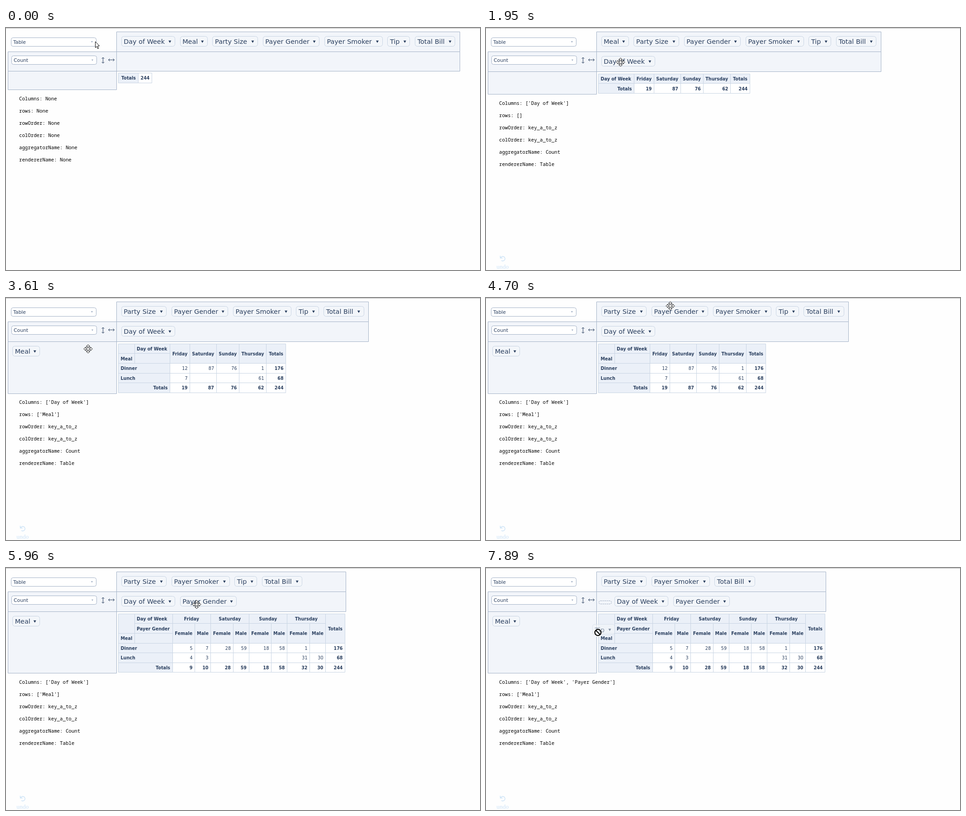
These frames come from a looping animation (1048 px wide and 535 px high, 8 s). An HTML page with a canvas:

```html
<!DOCTYPE html>
<html lang="en">
<head>
<meta charset="utf-8">
<title>Pivot table</title>
<style>
  html, body { margin: 0; width: 100%; height: 100%; overflow: hidden; background: #fefefe; }
  canvas { display: block; }
</style>
</head>
<body>
<canvas id="stage" width="1048" height="535"></canvas>
<script>
const ctx = document.getElementById('stage').getContext('2d');
const LOOP = 8000;
const INK = '#2a3f5f', FRAME = '#a2b1c6', SOFT = '#c8d4e3', ZONE = '#f2f5fa', HEAD = '#ebf0f8';
const SANS = '"DejaVu Sans", Verdana, sans-serif';
const GAP = 11.5, LEFT = 244.5, PLACEHOLDER = 29;

const chipWidths = {
  'Day of Week': 118.5, 'Meal': 60.4, 'Party Size': 99.7, 'Payer Gender': 124.7,
  'Payer Smoker': 127.9, 'Tip': 49.3, 'Total Bill': 88.5
};
const fields = Object.keys(chipWidths);
const days = ['Friday', 'Saturday', 'Sunday', 'Thursday'];
const daysAndTotals = [...days, 'Totals'];

// Heads are [col, row, endCol, endRow, text, align] in grid units.
const tables = [
  { top: 99.5, xs: [248.5, 292, 322.5], labelCols: 1, headRows: 0, heads: [], rows: ['Totals,244'] },
  {
    top: 101.3, xs: [248.5, 327.5, 371.5, 430, 480, 540.5, 583.5], labelCols: 1, headRows: 1,
    heads: [[0, 0, 1, 1, 'Day of Week', 'left'], ...daysAndTotals.map((d, i) => [1 + i, 0, 2 + i, 1, d])],
    rows: ['Totals,19,87,76,62,244']
  },
  {
    top: 101.3, xs: [248.5, 284, 362.5, 406.5, 465, 515.5, 575.5, 618.7], labelCols: 2, headRows: 2,
    heads: [[0, 0, 1, 1, ''], [1, 0, 2, 1, 'Day of Week', 'left'], [0, 1, 1, 2, 'Meal', 'left'], [1, 1, 2, 2, ''],
      ...daysAndTotals.map((d, i) => [2 + i, 0, 3 + i, 2, d])],
    rows: ['Dinner,12,87,76,1,176', 'Lunch,7,,,61,68', 'Totals,19,87,76,62,244']
  },
  {
    top: 101.3, xs: [248.5, 284, 368, 417.5, 452.5, 502, 537, 586.5, 621.5, 671.5, 706.5, 749.5],
    labelCols: 2, headRows: 3,
    heads: [[0, 0, 1, 2, ''], [1, 0, 2, 1, 'Day of Week', 'left'], [1, 1, 2, 2, 'Payer Gender', 'left'],
      [0, 2, 1, 3, 'Meal', 'left'], [1, 2, 2, 3, ''],
      ...days.map((d, i) => [2 + 2 * i, 0, 4 + 2 * i, 1, d]),
      ...[...days, ...days].map((_, i) => [2 + i, 1, 3 + i, 3, i % 2 ? 'Male' : 'Female']),
      [10, 0, 11, 3, 'Totals']],
    rows: ['Dinner,5,7,28,59,18,58,1,,176', 'Lunch,4,3,,,,,31,30,68', 'Totals,9,10,28,59,18,58,32,30,244']
  }
];
const zoneBottoms = [[95.5, 136.5], [96.5, 146.5], [96.5, 211], [96.5, 232.5]];

const drag = (name, dx, dy) => ({ drag: { name, dx, dy } });
const dayDrag = drag('Day of Week', 41, 20), mealDrag = drag('Meal', 21, 19);
const genderDrag = drag('Payer Gender', 54, 10), tipDrag = drag('Tip', 12, 18);
const drop = { drag: null, slot: null };

// [ms, cursor, x, y, state changes]; changes accumulate through the loop.
const steps = [
  [0, 'arrow', 197, 30, { table: 0, cols: [], rows: [], props: null, drag: null, slot: null }],
  [120, 'arrow', 184, 28],
  [240, 'arrow', 173, 26],
  [670, 'arrow', 229, 24],
  [790, 'move', 275, 27],
  [950, 'move', 296, 37],
  [1090, 'move', 295, 37],
  [1530, 'drag', 297, 67, { ...dayDrag, slot: ['cols', 0] }],
  [1680, 'drag', 297, 74],
  [1830, 'move', 297, 75, { ...drop, cols: ['Day of Week'], table: 1 }],
  [1950, 'move', 297, 75, { props: [['Day of Week'], []] }],
  [2370, 'move', 291, 55],
  [2500, 'move', 284, 34],
  [2640, 'move', 282, 32],
  [3070, 'drag', 242, 66, { ...mealDrag, slot: ['cols', 0] }],
  [3190, 'deny', 208, 84],
  [3340, 'drag', 191, 99, { slot: ['rows', 0] }],
  [3470, 'drag', 181, 111],
  [3610, 'move', 181, 112, { ...drop, rows: ['Meal'], table: 2, props: [['Day of Week'], ['Meal']] }],
  [4550, 'move', 322, 37],
  [4700, 'move', 407, 17],
  [4840, 'move', 416, 23],
  [4970, 'move', 421, 26],
  [5400, 'drag', 413, 76, genderDrag],
  [5530, 'drag', 410, 83, { slot: ['cols', 1] }],
  [5830, 'drag', 420, 80],
  [5950, 'move', 421, 80, { ...drop, cols: ['Day of Week', 'Payer Gender'], table: 3 }],
  [6080, 'move', 421, 80, { props: [['Day of Week', 'Payer Gender'], ['Meal']] }],
  [6920, 'move', 458, 61],
  [7070, 'move', 497, 39],
  [7230, 'move', 519, 33],
  [7380, 'move', 520, 34],
  [7650, 'drag', 420, 66, tipDrag],
  [7770, 'drag', 300, 84, { slot: ['cols', 0] }],
  [7890, 'deny', 247.5, 142.5]
];

function stateAt(ms) {
  const state = {};
  for (const [at, cursor, x, y, changes] of steps) {
    if (at > ms) break;
    Object.assign(state, { cursor, x, y }, changes);
  }
  return state;
}

const snap = v => Math.floor(v) + 0.5;

function write(text, x, y, font, color = INK, align = 'left') {
  ctx.font = font;
  ctx.fillStyle = color;
  ctx.textAlign = align;
  ctx.fillText(text, x, y);
}

function box(x0, y0, x1, y1, fill, stroke, radius = 0) {
  x0 = snap(x0); y0 = snap(y0);
  ctx.beginPath();
  ctx.roundRect(x0, y0, snap(x1) - x0, snap(y1) - y0, radius);
  if (fill) { ctx.fillStyle = fill; ctx.fill(); }
  ctx.lineWidth = 1;
  ctx.strokeStyle = stroke;
  ctx.stroke();
}

function polygon(points, fill, stroke) {
  ctx.beginPath();
  points.forEach(([x, y]) => ctx.lineTo(x, y));
  ctx.closePath();
  ctx.fillStyle = fill;
  ctx.fill();
  if (stroke) { ctx.strokeStyle = stroke; ctx.lineWidth = 1; ctx.stroke(); }
}

function triangle(x, y, half, color) {
  polygon([[x - half, y - half * 0.75], [x + half, y - half * 0.75], [x, y + half]], color);
}

function chip(name, x, y) {
  const right = x + chipWidths[name];
  box(x, y, right, y + 22.5, '#f3f6fa', SOFT, 5);
  write(name, x + 5.2, y + 17, `14.4px ${SANS}`);
  triangle(right - 11.2, y + 12, 3, INK);
}

function placeholder(x, y, width) {
  ctx.setLineDash([3, 1.5]);
  box(x, y, x + width, y + 7, null, '#9aa8bd', 4);
  ctx.setLineDash([]);
}

function chipRow(names, y, slotIndex = -1) {
  let x = 255;
  names.forEach((name, i) => {
    if (i === slotIndex) { placeholder(x - 5.5, y + 10, 28); x += PLACEHOLDER; }
    chip(name, x, y);
    x += chipWidths[name] + GAP;
  });
  if (slotIndex === names.length) placeholder(x - 5.5, y + 10, 28);
}

function dropdown(label, x, y) {
  box(x, y, x + 188.5, y + 19, '#fff', FRAME, 4);
  write(label, x + 5, y + 13.5, `10.8px ${SANS}`);
  triangle(x + 179, y + 9.5, 2, FRAME);
}

function sortArrow(x, y, angle) {
  ctx.save();
  ctx.translate(x, y);
  ctx.rotate(angle);
  ctx.beginPath();
  ctx.moveTo(-6.5, 0); ctx.lineTo(6.5, 0);
  for (const s of [-1, 1]) {
    ctx.moveTo(s * 3.5, -3); ctx.lineTo(s * 6.5, 0); ctx.lineTo(s * 3.5, 3);
  }
  ctx.strokeStyle = INK;
  ctx.lineWidth = 1;
  ctx.stroke();
  ctx.restore();
}

function drawTable({ top, xs, labelCols, headRows, heads, rows }) {
  const cell = (c0, r0, c1, r1, text, align = 'center', bold = true, fill = HEAD) => {
    const [x0, x1] = [xs[c0], xs[c1]];
    const [y0, y1] = [r0, r1].map(r => top + 21.6 * r);
    box(x0, y0, x1, y1, fill, SOFT);
    const x = { left: x0 + 5, right: x1 - 5, center: (x0 + x1) / 2 }[align];
    write(text, x, Math.round((y0 + y1) / 2 + 3.8), `${bold ? 'bold ' : ''}9.6px ${SANS}`, INK, align);
  };
  heads.forEach(head => cell(...head));
  rows.forEach((row, i) => {
    const [label, ...values] = row.split(',');
    const r = headRows + i, total = label === 'Totals';
    cell(0, r, labelCols, r + 1, label, total ? 'right' : 'left');
    values.forEach((value, j) => {
      const c = labelCols + j;
      cell(c, r, c + 1, r + 1, value, 'right', total || j === values.length - 1, '#fff');
    });
  });
}

function drawProps(props, top) {
  const list = names => `[${names.map(n => `'${n}'`).join(', ')}]`;
  const values = props
    ? [list(props[0]), list(props[1]), 'key_a_to_z', 'key_a_to_z', 'Count', 'Table']
    : Array(6).fill('None');
  ['Columns', 'rows', 'rowOrder', 'colOrder', 'aggregatorName', 'rendererName'].forEach((key, i) =>
    write(`${key}: ${values[i]}`, 29, Math.round(top + 27 * i), '10.72px "Noto Sans Mono", monospace', '#000'));
}

function drawUndo() {
  const color = '#cce3f7';
  ctx.strokeStyle = color;
  ctx.lineWidth = 1.4;
  ctx.beginPath();
  ctx.arc(37, 510, 5, -Math.PI * 0.9, Math.PI * 0.7);
  ctx.moveTo(31.5, 503.5); ctx.lineTo(31.5, 508.5); ctx.lineTo(36.5, 508.5);
  ctx.stroke();
  write('undo', 36.7, 532, '13.5px "Liberation Serif", serif', color, 'center');
}

const cursors = {
  arrow() {
    polygon([[0.5, 0], [0.5, 13.5], [3.5, 10.8], [5.8, 15.8], [7.8, 15], [5.6, 10], [9.5, 9.5]], '#fff', '#000');
  },
  drag() {
    cursors.arrow();
    box(3, 15, 11, 21, '#fff', '#000');
    ctx.setLineDash([1, 1]);
    box(4, 16, 10, 20, null, '#777');
    ctx.setLineDash([]);
  },
  move() {
    const arm = [[0, -9.5], [4, -5.5], [1.5, -5.5], [1.5, -1.5], [5.5, -1.5], [5.5, -4]];
    const turn = ([x, y], n) => n ? turn([-y, x], n - 1) : [x, y];
    ctx.translate(0.5, 0.5);
    polygon([0, 1, 2, 3].flatMap(n => arm.map(p => turn(p, n))), '#fff', '#000');
  },
  deny() {
    ctx.beginPath();
    ctx.arc(0, 0, 6.8, 0, Math.PI * 2);
    ctx.moveTo(-4.8, -4.8); ctx.lineTo(4.8, 4.8);
    for (const [color, width] of [['#fff', 3.8], ['#000', 2.3]]) {
      ctx.strokeStyle = color;
      ctx.lineWidth = width;
      ctx.stroke();
    }
  }
};

function draw(ms) {
  const s = stateAt(ms);
  const table = tables[s.table];
  const [colsBottom, rowsBottom] = zoneBottoms[s.table];
  const [slotZone, slotIndex] = s.slot || [];
  const unused = fields.filter(f => !s.cols.includes(f) && !s.rows.includes(f) && f !== s.drag?.name);
  const unusedEnd = unused.reduce((x, f) => x + chipWidths[f] + GAP, 255);
  const right = Math.max(unusedEnd - 0.8, table.xs.at(-1) + 2);

  ctx.fillStyle = '#fefefe';
  ctx.fillRect(0, 0, 1048, 535);
  ctx.fillStyle = '#b4b4b4';
  ctx.fillRect(0, 0, 1048, 1);

  box(LEFT, 8.5, right, 52.5, ZONE, FRAME);
  box(LEFT, 52.5, right, colsBottom, ZONE, FRAME);
  box(4, 52.5, LEFT, colsBottom, ZONE, FRAME);
  box(4, colsBottom, LEFT, rowsBottom, ZONE, FRAME);

  dropdown('Table', 11, 21);
  dropdown('Count', 12, 61.5);
  sortArrow(214.5, 71.5, Math.PI / 2);
  sortArrow(233, 70.5, 0);

  chipRow(unused, 18);
  chipRow(s.cols, 62, slotZone === 'cols' ? slotIndex : -1);
  if (slotZone === 'rows') placeholder(9, 102, 230);
  s.rows.forEach(name => chip(name, 14.5, 106));

  drawTable(table);
  drawProps(s.props, rowsBottom + 23.3);
  if (s.props) drawUndo();

  if (s.drag) {
    ctx.globalAlpha = 0.55;
    chip(s.drag.name, s.x - s.drag.dx, s.y - s.drag.dy);
    ctx.globalAlpha = 1;
  }
  ctx.save();
  ctx.translate(s.x, s.y);
  cursors[s.cursor]();
  ctx.restore();
}

const start = performance.now();
function tick() {
  draw((performance.now() - start) % LOOP);
  requestAnimationFrame(tick);
}
tick();
</script>
</body>
</html>
```
